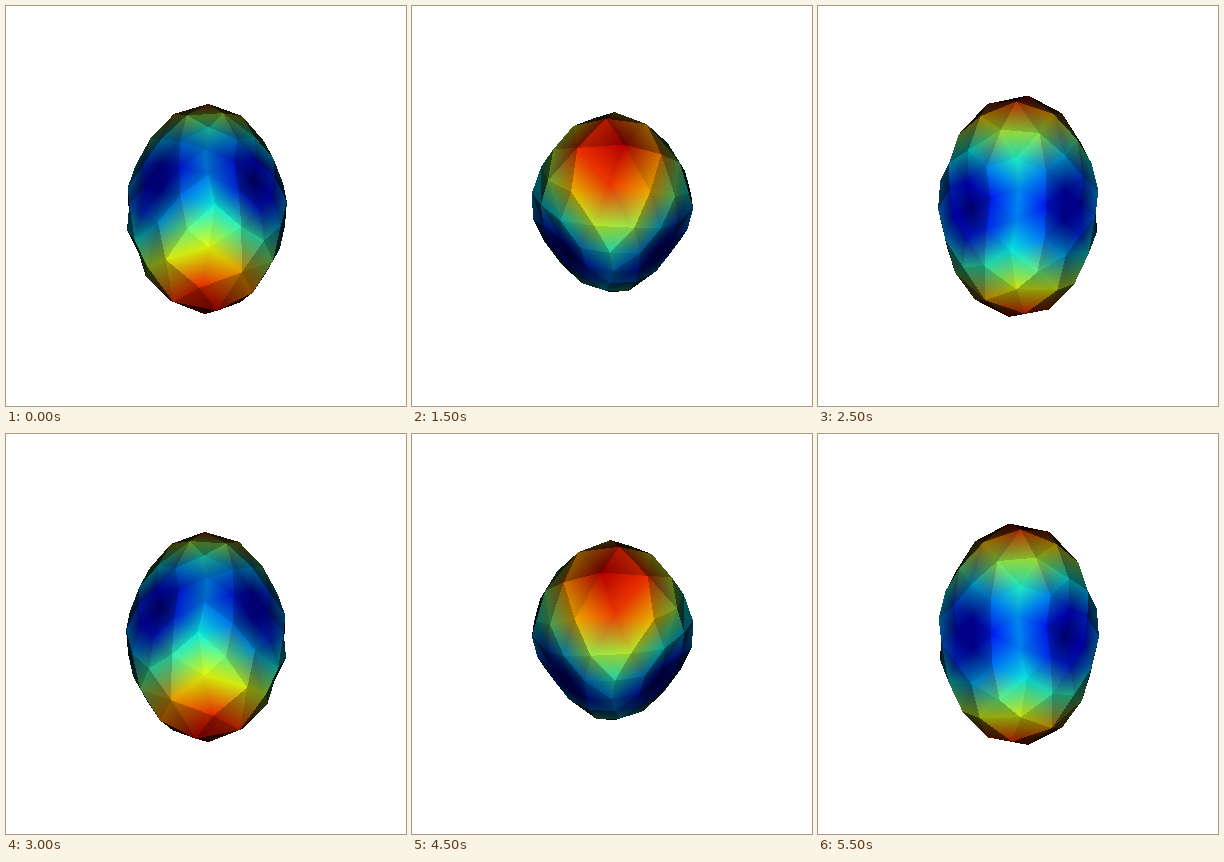
These frames come from a looping animation (400x400 px, 6 s). A matplotlib script:

```python
import numpy as np
import matplotlib.pyplot as plt
from matplotlib.animation import FuncAnimation

SIZE, FRAMES, INTERVAL = 400, 12, 500
CENTER, CAMERA = 200, 748
PAIRS = 50                          # vertices come in opposite pairs

# Body axes: across, long, short. The most visible corners of the mesh.
CORNERS = [(-0.95, 0.32, 0.0), (0.85, 0.5, -0.12), (-0.19, 0.67, 0.72), (0.02, 0.79, 0.62),
           (-0.38, 0.82, 0.43), (-0.17, 0.75, -0.64), (0.42, 0.9, 0.0)]


def unit(p):
    return p / np.linalg.norm(p, axis=-1, keepdims=True)


def spread_directions(steps=400):
    """Opposite pairs of unit vectors that repel each other; corners stay put."""
    rng = np.random.default_rng(4)
    fixed = len(CORNERS)
    half = unit(np.concatenate([CORNERS, rng.normal(size=(PAIRS - fixed, 3))]))
    for step in range(steps):
        every = np.concatenate([half, -half])
        delta = half[:, None] - every
        dist = np.linalg.norm(delta, axis=2, keepdims=True)
        force = (delta / np.maximum(dist, 0.05)**3).sum(axis=1)
        force -= half * (force * half).sum(axis=1, keepdims=True)
        move = 0.02 * (1 - step / steps) * force
        move *= np.minimum(1, 0.1 / np.maximum(np.linalg.norm(move, axis=1, keepdims=True), 1e-9))
        half[fixed:] = unit(half[fixed:] + move[fixed:])
    return np.concatenate([half, -half])


def hull(d):
    """Triangles of the convex hull of unit vectors."""
    faces = []
    for i in range(len(d) - 2):
        j, k = np.triu_indices(len(d) - i - 1, 1)
        j, k = j + i + 1, k + i + 1
        n = np.cross(d[j] - d[i], d[k] - d[i])
        n *= np.where(n @ d[i] < 0, -1, 1)[:, None]
        keep = (n @ d.T).max(axis=1) <= n @ d[i] + 1e-9
        faces += [(i, a, b) for a, b in zip(j[keep], k[keep])]
    return np.array(faces)


def profile(d):
    """Value along each direction; it sets both radius and colour."""
    x, l, n = (d**2).T
    return 0.95 * l + 0.31 * x + 0.25 * n - l * (0.5 * x + 0.2 * n) - 1.05 * x * n


DIRECTIONS = spread_directions()
FACES = hull(DIRECTIONS)
VALUES = profile(DIRECTIONS)
VERTICES = DIRECTIONS * (67 + 47 * VALUES)[:, None]
COLORS = plt.cm.jet(np.clip(VALUES, 0, 1))[:, :3]


def turn(step):
    """Matrix from body axes to view axes, 30 degrees per step."""
    a = np.radians(30 * (step - 2))
    s, c = np.sin(a), np.cos(a)
    return np.array([[1, 0, 0], [0, s, c], [0, c, -s]])


def render(step):
    image = np.ones((SIZE, SIZE, 3))
    p = VERTICES @ turn(step)
    scale = 1 / (1 - p[:, 2] / CAMERA)
    sx, sy = CENTER + p[:, 0] * scale, CENTER - p[:, 1] * scale
    for f in sorted(FACES, key=lambda face: p[face, 2].sum()):
        a, b, c = p[f]
        mid = (a + b + c) / 3
        n = unit(np.cross(b - a, c - a))
        n = n if n @ mid > 0 else -n
        light = n @ unit(np.array([0, 0, CAMERA]) - mid)
        if light <= 0:
            continue
        x, y = sx[f], sy[f]
        area = (x[1] - x[0]) * (y[2] - y[0]) - (x[2] - x[0]) * (y[1] - y[0])
        if abs(area) < 1e-6:
            continue
        x0, x1 = int(x.min()), int(x.max()) + 2
        y0, y1 = int(y.min()), int(y.max()) + 2
        gy, gx = np.mgrid[y0:y1, x0:x1]
        u = ((gx - x[0]) * (y[2] - y[0]) - (x[2] - x[0]) * (gy - y[0])) / area
        v = ((x[1] - x[0]) * (gy - y[0]) - (gx - x[0]) * (y[1] - y[0])) / area
        w = np.stack([1 - u - v, u, v], axis=-1)
        inside = w.min(axis=-1) >= -1e-6
        image[y0:y1, x0:x1][inside] = light * (w[inside] @ COLORS[f])
    return np.clip(image, 0, 1)


fig = plt.figure(figsize=(4, 4), dpi=100, facecolor="white")
ax = fig.add_axes([0, 0, 1, 1])
ax.axis("off")
picture = ax.imshow(render(0), interpolation="nearest", aspect="auto")


def update(step):
    picture.set_data(render(step))
    return [picture]


anim = FuncAnimation(fig, update, frames=FRAMES, interval=INTERVAL, repeat=True, repeat_delay=0)
plt.show()
```
